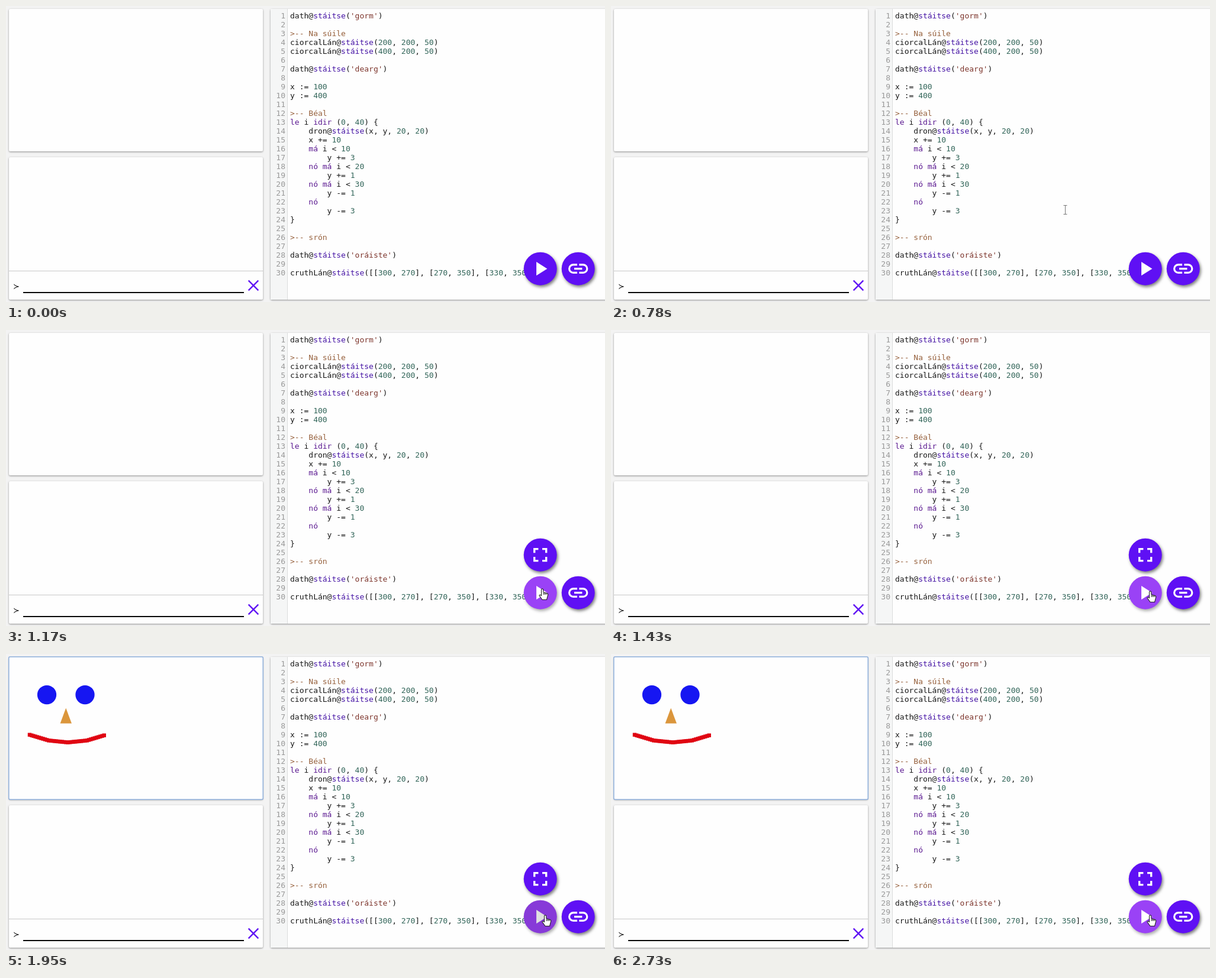
These frames come from a looping animation (1012x501 px, 3120 ms). An HTML page with a canvas:

```html
<!DOCTYPE html>
<html lang="ga">
<head>
<meta charset="utf-8">
<title>Code editor</title>
<style>
html, body { margin: 0; width: 100%; height: 100%; overflow: hidden; background: #f3f3f3; }
canvas { display: block; }
</style>
</head>
<body>
<canvas id="stage" width="1012" height="501"></canvas>
<script>
const ctx = document.getElementById('stage').getContext('2d');
const LOOP = 3120, TICK = 130;
const PURPLE = '#5f10f4', HOVER = '#9a42f6';
const FONT = '13px "DejaVu Sans Mono", monospace';
const LINE = 15;

const CODE = `dath@stáitse('gorm')

>-- Na súile
ciorcalLán@stáitse(200, 200, 50)
ciorcalLán@stáitse(400, 200, 50)

dath@stáitse('dearg')

x := 100
y := 400

>-- Béal
le i idir (0, 40) {
    dron@stáitse(x, y, 20, 20)
    x += 10
    má i < 10
        y += 3
    nó má i < 20
        y += 1
    nó má i < 30
        y -= 1
    nó
        y -= 3
}

>-- srón

dath@stáitse('oráiste')

cruthLán@stáitse([[300, 270], [270, 350], [330, 350]])`.split('\n');

const TOKEN = /(>--.*|'[^']*'|stáitse|(?:le|idir|má|nó)(?= |$)|\d+)/;

function tokenColor(s) {
  if (s.startsWith('>--')) return '#96603c';
  if (s[0] === "'") return '#7d352c';
  if (s === 'stáitse') return '#4412a4';
  if (/^\d/.test(s)) return '#33665a';
  return /^(le|idir|má|nó)$/.test(s) ? '#5a1890' : '#181818';
}

function rect(x, y, w, h, color) {
  ctx.fillStyle = color;
  ctx.fillRect(x, y, w, h);
}

function disc(x, y, r, color) {
  ctx.fillStyle = color;
  ctx.beginPath();
  ctx.arc(x, y, r, 0, 7);
  ctx.fill();
}

function poly(points, close) {
  ctx.beginPath();
  points.forEach(([x, y]) => ctx.lineTo(x, y));
  if (close) ctx.closePath();
}

function at(x, y, scale, draw) {
  ctx.save();
  ctx.translate(x, y);
  ctx.scale(scale, scale);
  draw();
  ctx.restore();
}

function shadow(color, dx, dy, blur) {
  ctx.shadowColor = color;
  ctx.shadowOffsetX = dx;
  ctx.shadowOffsetY = dy;
  ctx.shadowBlur = blur;
}

function panel(x, y, w, h) {
  ctx.save();
  shadow('rgba(0,0,0,.42)', 0, 1, 3);
  ctx.fillStyle = '#fefefe';
  ctx.beginPath();
  ctx.roundRect(x, y, w, h, 2);
  ctx.fill();
  ctx.restore();
}

function drawEditor() {
  panel(447, 5, 580, 492);
  rect(447, 5, 28, 492, '#f5f6f6');
  rect(475, 5, 1, 492, '#dcdcdc');
  ctx.font = FONT;
  const cell = ctx.measureText('0').width;
  CODE.forEach((line, i) => {
    const y = 21 + i * LINE;
    ctx.textAlign = 'right';
    ctx.fillStyle = '#999';
    ctx.fillText(i + 1, 472, y);
    ctx.textAlign = 'left';
    let col = 0;
    for (const part of line.split(TOKEN)) {
      ctx.fillStyle = tokenColor(part);
      ctx.fillText(part, 480 + col * cell, y);
      col += part.length;
    }
  });
}

function drawConsole() {
  panel(5, 256, 429, 241);
  rect(5, 448, 429, 1, '#c8c8c8');
  ctx.font = '13px "DejaVu Sans", sans-serif';
  ctx.fillStyle = '#111';
  ctx.fillText('≻', 12, 479);
  rect(29, 484, 373, 2, '#080808');
  ctx.strokeStyle = PURPLE;
  ctx.lineWidth = 2.4;
  at(418, 473, 1, () => {
    for (const s of [-1, 1]) {
      poly([[-8.3, -8.3 * s], [8.3, 8.3 * s]]);
      ctx.stroke();
    }
  });
}

// The picture that the program in the editor paints.
function drawFace() {
  at(4.5, 4.5, 0.3225, () => {
    disc(200, 200, 50, '#1616f2');
    disc(400, 200, 50, '#1616f2');
    let x = 100, y = 400;
    for (let i = 0; i < 40; i++) {
      rect(x, y, 20, 20, '#e00612');
      x += 10;
      y += [3, 1, -1, -3][Math.floor(i / 10)];
    }
    ctx.fillStyle = '#db963c';
    poly([[300, 270], [270, 350], [330, 350]], true);
    ctx.fill();
  });
}

function drawOutput(done) {
  panel(5, 5, 429, 241);
  if (!done) return;
  ctx.strokeStyle = '#8fb0dc';
  ctx.lineWidth = 1.5;
  ctx.beginPath();
  ctx.roundRect(4.75, 4.75, 429.5, 241.5, 2);
  ctx.stroke();
  drawFace();
}

const icons = {
  play() {
    poly([[-4, -7], [-4, 7], [7, 0]], true);
    ctx.fill();
  },
  link() {
    ctx.lineWidth = 1.9;
    for (const s of [-1, 1]) {
      ctx.beginPath();
      ctx.moveTo(s, -4.05);
      ctx.lineTo(5 * s, -4.05);
      ctx.arc(5 * s, 0, 4.05, -Math.PI / 2, Math.PI / 2, s < 0);
      ctx.lineTo(s, 4.05);
      ctx.stroke();
    }
    ctx.fillRect(-4, -1, 8, 2);
  },
  expand() {
    ctx.lineWidth = 2;
    for (const sx of [-1, 1]) for (const sy of [-1, 1]) {
      poly([[6 * sx, 2 * sy], [6 * sx, 6 * sy], [2 * sx, 6 * sy]]);
      ctx.stroke();
    }
  }
};

function button(x, y, icon, hover) {
  ctx.save();
  shadow(`rgba(0,0,0,${hover ? 0.32 : 0.5})`, 2, 3, 5);
  disc(x, y, 28, hover ? HOVER : PURPLE);
  ctx.restore();
  ctx.fillStyle = ctx.strokeStyle = '#fff';
  at(x, y, 40 / 24, icons[icon]);
}

const cursors = {
  beam() {
    ctx.strokeStyle = '#777';
    ctx.lineWidth = 1;
    poly([[-3, -7.5], [3, -7.5]]);
    ctx.stroke();
    poly([[-3, 7.5], [3, 7.5]]);
    ctx.stroke();
    poly([[0, -7.5], [0, 7.5]]);
    ctx.stroke();
  },
  arrow() {
    poly([[0, 0], [0, 15], [3.5, 12], [6, 17.5], [8.5, 16.3], [6, 11], [10.5, 10.5]], true);
    ctx.fillStyle = '#111';
    ctx.strokeStyle = '#fff';
    ctx.lineWidth = 1;
    ctx.fill();
    ctx.stroke();
  },
  hand() {
    ctx.beginPath();
    ctx.moveTo(-1.5, 1);
    ctx.quadraticCurveTo(0, -1, 1.5, 1);
    ctx.lineTo(2, 6);
    ctx.lineTo(8, 7.5);
    ctx.quadraticCurveTo(10, 8, 9.5, 11);
    ctx.lineTo(7.5, 18.5);
    ctx.lineTo(0, 18.5);
    ctx.lineTo(-5, 11.5);
    ctx.quadraticCurveTo(-5, 9, -1.5, 11.5);
    ctx.closePath();
    ctx.fillStyle = '#fff';
    ctx.strokeStyle = '#222';
    ctx.lineWidth = 1.1;
    ctx.fill();
    ctx.stroke();
    for (const x of [2.2, 4.5, 6.8]) {
      poly([[x, 7], [x, 10]]);
      ctx.stroke();
    }
  }
};

// Pointer path: time, shape, position.
const PATH = [
  [780, 'beam', 767.5, 345],
  [910, 'beam', 829.5, 388],
  [1040, 'arrow', 882, 420],
  [1170, 'hand', 906, 438],
  [1300, 'hand', 911, 442]
];

function drawPointer(t) {
  const step = PATH.filter(p => p[0] <= t).pop();
  if (step) at(step[2], step[3], 1, cursors[step[1]]);
}

function pressAmount(t) {
  if (t < 1690 || t >= 2210) return 0;
  return t < 2080 ? Math.min(1, (t - 1560) / 260) : 0.5;
}

function render(t) {
  rect(0, 0, 1012, 501, '#f3f3f3');
  drawOutput(t >= 1690);
  drawConsole();
  drawEditor();
  if (t >= 1040) button(902.7, 380.7, 'expand');
  button(902.7, 444.7, 'play', t >= 1170);
  const press = pressAmount(t);
  if (press) disc(902.7, 444.7, 28, `rgba(0,0,0,${0.12 * press})`);
  button(966.7, 444.7, 'link');
  drawPointer(t);
}

function frame() {
  const t = performance.now() % LOOP;
  render(Math.floor(t / TICK) * TICK);
  requestAnimationFrame(frame);
}
frame();
</script>
</body>
</html>
```
